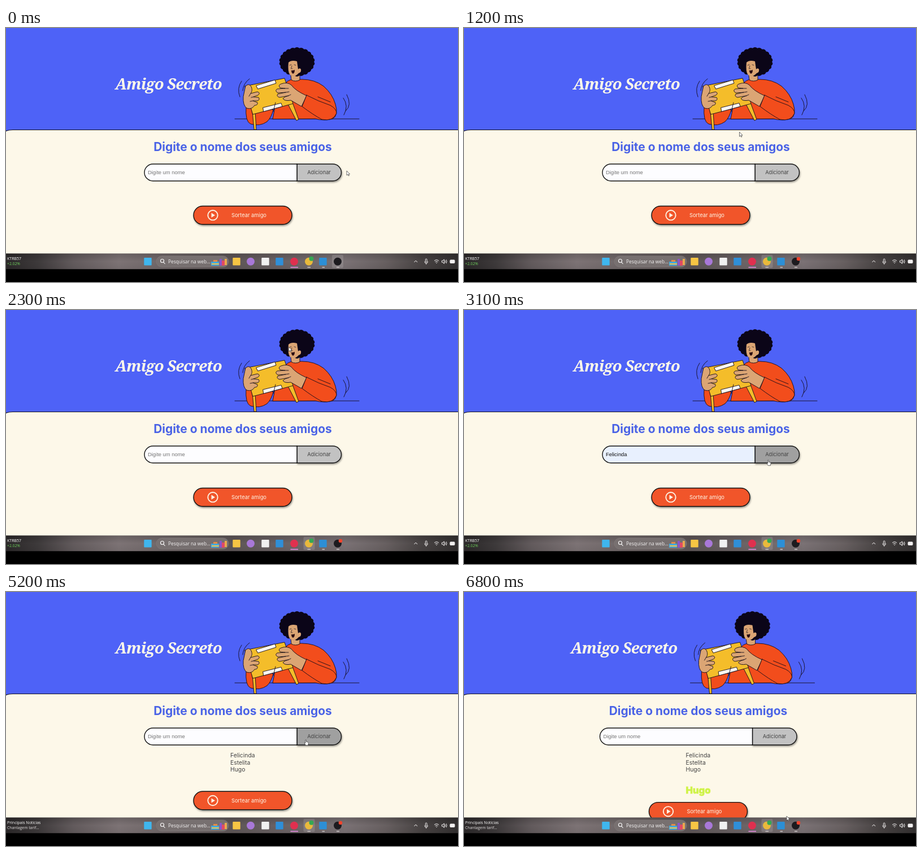
Recreate the animation shown at these times as an HTML page. Size 800 by 450 pixels, loop 6900 ms.

```html
<!DOCTYPE html>
<html lang="pt-BR">
<head>
<meta charset="utf-8">
<title>Amigo Secreto</title>
<style>
html, body { margin: 0; width: 100%; height: 100%; overflow: hidden; background: #000; }
svg { display: block; width: 800px; height: 450px; }
text { font-family: Inter, sans-serif; }
.title { font: italic 900 27.5px "Noto Serif", serif; letter-spacing: -.9px; fill: #fdf8ea; }
.heading { font-size: 20.9px; font-weight: 700; fill: #4a63e6; }
.field { font: 9.4px "Liberation Sans", Arial, sans-serif; }
.btn { font-size: 9.3px; }
.list text { font-size: 10.4px; fill: #444; }
.bar text, .dialog text { font-family: "Open Sans", "Noto Sans", sans-serif; }
.art { stroke: #160d1c; stroke-width: .9; stroke-linejoin: round; stroke-linecap: round; }
.coat { fill: #f24d1c; }
.skin { fill: #dba574; }
.wood { fill: #f4bd2a; }
.paper { fill: #fbf7f2; }
.line { fill: none; }
#result { font-weight: 800; paint-order: stroke; stroke-width: 1px; }
.shadow { filter: drop-shadow(1px 2px 1.5px rgba(0, 0, 0, .4)); }
</style>
</head>
<body>
<svg viewBox="0 0 800 450">
  <defs>
    <linearGradient id="steel">
      <stop offset="0" stop-color="#2d2a2b"/>
      <stop offset=".07" stop-color="#403c3d"/>
      <stop offset=".15" stop-color="#675f61"/>
      <stop offset=".25" stop-color="#82787a"/>
      <stop offset=".34" stop-color="#766d6e"/>
      <stop offset=".5" stop-color="#625a5b"/>
      <stop offset=".75" stop-color="#80777a"/>
      <stop offset=".84" stop-color="#6c6465"/>
      <stop offset=".92" stop-color="#4b4646"/>
      <stop offset="1" stop-color="#353232"/>
    </linearGradient>
    <linearGradient id="shade" x2="0" y2="1">
      <stop offset="0" stop-opacity=".2"/>
      <stop offset=".5" stop-opacity=".04"/>
      <stop offset="1" stop-opacity=".1"/>
    </linearGradient>
  </defs>

  <rect width="800" height="400" fill="#4e62f7"/>
  <g class="shift">
    <text class="title" x="287.5" y="109" text-anchor="middle">Amigo Secreto</text>
    <g class="art">
      <path class="line" d="M405 161H625"/>
      <path class="line" d="M417 94Q408 107 414 122M431 90Q420 98 419 111M597 124Q607 138 598 154M603 118Q613 137 601 147"/>
      <path class="coat" d="M425 139Q423 166 433 170Q449 175 462 166Q470 158 473 145L450 138Z"/>
      <path class="coat" d="M472 161Q476 140 480 122L493 100Q498 92 508 91H524Q546 91 562 103Q578 117 583 135Q589 155 578 161Q564 165 548 161Z"/>
      <path class="skin" d="M504 84L505 92Q512 96 520 92V78Z"/>
      <path id="hair" fill="#0b0518" stroke="none"/>
      <path class="skin" stroke="none" d="M500 61Q498 80 504 84Q511 88 518 80Q523 79 522 73Q520 70 517 73L515 59Q505 56 500 61Z"/>
      <path class="line" stroke-width=".7" d="M502 66L505 65M510 65L513 66M506 67L504.5 72H507"/>
      <path d="M505 75Q508 76 511 74Q511 80 508 81Q505 80 505 75Z" fill="#2a0d12" stroke="none"/>
      <path class="wood" d="M436 147L439 180H443L441 147ZM499 135L514 164L518 162L507 132Z"/>
      <path class="wood" d="M423 103L493 89L508 134L437 153Z"/>
      <path class="paper" d="M443 102L476 92L478 98L446 108ZM455 141L487 133L489 139L456 148Z"/>
      <path class="skin" d="M424 103Q430 97 434 104Q437 111 433 116L445 113Q451 115 446 119L438 122L447 123Q450 127 445 129L437 129L445 132Q446 137 440 137Q435 145 426 142Q419 137 420 122Z"/>
      <path class="line" d="M433 116L430 121M438 122L434 123M437 129L432 130"/>
      <path class="skin" d="M532 120L523 139L504 128Q493 130 490 125Q494 121 500 120L484 123Q478 121 481 117L495 114L481 115Q475 111 480 108L494 107L485 106Q481 101 487 99Q498 95 505 101Q512 111 532 120Z"/>
      <path class="line" d="M495 114L501 113M494 107L500 107M500 120L504 118"/>
      <path class="coat" d="M532 119L524 139Q544 154 559 162Q579 166 585 151Q585 143 574 137Q553 130 532 119Z"/>
      <path class="line" d="M552 122L574 131M473 148L477 132"/>
    </g>
  </g>

  <path d="M-4 185Q1 180.5 12 180.5H804V404H-4Z" fill="#fdf8e9" stroke="#0f0d22" stroke-width="1.2"/>
  <g class="shift">
    <text class="heading" x="419" y="218" text-anchor="middle">Digite o nome dos seus amigos</text>
    <path id="add" class="shadow" d="M515 241H578.5A15 15 0 0 1 578.5 271H515Z" stroke="#111" stroke-width="1.4"/>
    <path id="input" d="M515 241H260A15 15 0 0 0 260 271H515Z" stroke="#111" stroke-width="1.4"/>
    <text id="value" class="field" x="251" y="259.3"></text>
    <text class="btn" x="554" y="259.3" text-anchor="middle" fill="#444">Adicionar</text>
    <g id="list" class="list"></g>
    <text id="result" x="419" text-anchor="middle"></text>
    <g id="draw">
      <rect class="shadow" x="332" y="315.5" width="174" height="32.5" rx="16" fill="#f1552a" stroke="#111" stroke-width="1.4"/>
      <circle cx="366" cy="331.7" r="8.7" fill="none" stroke="#fdf3e4" stroke-width="1.9"/>
      <path d="M363.5 327.6L370 331.7L363.5 335.8Z" fill="#fdf3e4"/>
      <text class="btn" x="430" y="335" text-anchor="middle" fill="#fdf8e9">Sortear amigo</text>
    </g>
  </g>

  <rect id="scrim" width="800" height="400" opacity=".6"/>
  <g id="dialog" class="dialog">
    <path d="M288 0H549V50Q549 52 547 52H290Q288 52 288 50Z" fill="#202228"/>
    <text id="message" x="300" y="5.3" font-size="7.2" fill="#c6c9d6"></text>
    <rect x="499" y="16" width="41" height="25.5" rx="12.7" fill="none" stroke="#b5c4fb" stroke-width="1.4"/>
    <rect x="501.5" y="18.5" width="36" height="20.5" rx="10" fill="#a9bbfa"/>
    <text x="519.5" y="31.5" font-size="7" text-anchor="middle" fill="#1c2550">OK</text>
  </g>

  <g class="bar">
    <rect y="399.5" width="800" height="28" fill="url(#steel)"/>
    <rect y="399.5" width="800" height="28" fill="url(#shade)"/>
    <rect y="427.5" width="800" height="23"/>
    <text id="news" x="2" y="411.3" font-size="7" fill="#fff"></text>
    <text id="detail" x="2" y="420.3" font-size="6.8"></text>
    <rect x="266" y="404" width="128" height="19.5" rx="9.7" fill="#777070" stroke="#857d7d" stroke-width=".6"/>
    <g fill="none" stroke="#fff" stroke-width="1.1">
      <circle cx="276.5" cy="412.5" r="3"/>
      <path d="M278.8 415L281.5 418"/>
    </g>
    <text x="287" y="417" font-size="8.3" fill="#f4f2f2">Pesquisar na web...</text>
    <path d="M363 414H377V421H363Z" fill="#43a9de"/>
    <path d="M364 417H377V419H364Z" fill="#f0c44c"/>
    <path d="M367 411H374V414H367Z" fill="#e58b45"/>
    <path d="M378 409H382V421H378Z" fill="#8b56c9"/>
    <path d="M382 412H387V421H382Z" fill="#e04b64"/>
    <path d="M387 409H391V420H387Z" fill="#e8a84f"/>
    <rect id="active" y="402" width="20" height="23" rx="2" fill="#fff" opacity=".14"/>
    <g id="icons"></g>
    <circle cx="540.5" cy="408.8" r="4" fill="#35a853"/>
    <circle id="rec" cx="592" cy="409" r="3.3" fill="#f0452e"/>
    <path d="M503.5 424H517" stroke="#e58be0" stroke-width="1.6"/>
    <path d="M533.5 424H539M559.5 424H564M585 424H590" stroke="#c9c3c3" stroke-width="1.4"/>
    <g fill="none" stroke="#f2f0f0" stroke-width="1">
      <path d="M722.5 415L725.3 412L728 415M741 413.5Q741 417 743.7 417T746.5 413.5M743.7 417V419"/>
      <rect x="742.4" y="409" width="2.6" height="6" rx="1.3"/>
      <path d="M758 412.5Q762 409 766 412.5M759.6 414.5Q762 412.3 764.4 414.5M761.2 416.3H762.8"/>
      <path d="M771.5 412.2H773L775.5 410V417.5L773 415.2H771.5ZM777.2 411.8Q778.6 413.7 777.2 415.8M779 410.4Q781.2 413.7 779 417"/>
      <rect x="786" y="411" width="8" height="5.5" rx="1" fill="#f2f0f0"/>
    </g>
  </g>

  <g id="cursor" stroke="#333" stroke-width=".7" stroke-linejoin="round" fill="#fff">
    <path d="M0 0V8L1.9 6.3L3.2 9L4.5 8.4L3.2 5.9L5.6 5.8Z"/>
    <path d="M0 0Q1.3-.7 1.5 .7V3.3L4.6 4.2Q5.6 4.6 5.3 6L4.6 9.6H.6L-1.8 6Q-2.2 4.9-.7 5.4L-.1 6Z"/>
    <path d="M-1.5-4H1.5M0-4V4M-1.5 4H1.5" fill="none"/>
  </g>
</svg>
<script>
const LOOP = 6900, STEP = 100, SHIFT = -4.5;
const names = ["Felicinda", "Estelita", "Hugo"];
const filledAt = [2800, 3800, 4800], addedAt = [3300, 4200, 5200];
const resultAt = 5700, newsAt = 5200;
const dialogs = [
  { from: 500, to: 1000, text: "Por favor, insira um nome" },
  { from: 1500, to: 2200, text: "Adicione pelo menos dois amigos para sortear" }
];
// time, x, y
const path = [
  [0, 603, 253], [100, 602, 253], [400, 554, 252], [600, 554, 252],
  [900, 519, 30], [1000, 519, 30], [1400, 456, 338.5], [1700, 456, 338.5],
  [2000, 519, 30], [2200, 519, 30], [2600, 400, 257], [2800, 400, 257],
  [3000, 538, 266], [3300, 537, 266], [3600, 400, 258], [3800, 400, 258],
  [4100, 527, 264], [4400, 527, 264], [4600, 400, 258], [4800, 400, 258],
  [5000, 530, 262], [5200, 530, 262], [5500, 438, 366], [5700, 437, 364],
  [6000, 437, 364], [6600, 571, 397], [6900, 571, 397]
];

const $ = id => document.getElementById(id);
const set = (node, attrs) => { for (const k in attrs) node.setAttribute(k, attrs[k]); };
const show = (node, on) => { node.style.display = on ? "" : "none"; };
const mix = (a, b, k) => a + (b - a) * k;
const ease = k => k * k * (3 - 2 * k);
const clamp = k => Math.max(0, Math.min(1, k));
function make(parent, tag, attrs) {
  const node = document.createElementNS("http://www.w3.org/2000/svg", tag);
  set(node, attrs);
  return parent.appendChild(node);
}

// Curly outline
const curls = 22, hairPoint = (i, rx, ry) => {
  const a = i / curls * 2 * Math.PI;
  return (515 + rx * Math.cos(a)).toFixed(1) + " " + (60 + ry * Math.sin(a)).toFixed(1);
};
let hair = "M" + hairPoint(0, 30, 24.5);
for (let i = 1; i <= curls; i++) hair += "Q" + hairPoint(i - .5, 33.5, 27.5) + " " + hairPoint(i, 30, 24.5);
set($("hair"), { d: hair });

const squares = [[251, "#3fb6ee"], [408, "#f6c544"], [459, "#f1f1f1"], [484, "#2f8fd8"], [561, "#2c8fd6"]];
const dots = [[433, "#a878d8"], [510, "#e0304f"], [536, "#e9b93c"], [587, "#1d1b1f"]];
for (const [x, fill] of squares) make($("icons"), "rect", { x: x - 6.7, y: 407, width: 13.4, height: 13.4, rx: 1, fill });
for (const [x, fill] of dots) make($("icons"), "circle", { cx: x, cy: 413.7, r: 7, fill });

const items = names.map((name, i) => {
  const item = make($("list"), "text", { x: 397, y: 293 + 12.6 * i });
  item.textContent = name;
  return item;
});

function cursorAt(t) {
  const i = path.findIndex(p => p[0] > t);
  const a = path[i - 1], b = path[i], k = ease((t - a[0]) / (b[0] - a[0]));
  return [mix(a[1], b[1], k), mix(a[2], b[2], k)];
}

function render(t) {
  const count = addedAt.filter(at => t >= at).length;
  const drawn = t >= resultAt;
  const grow = clamp((t - 5800) / 500);
  const dialog = dialogs.find(d => t >= d.from && t <= d.to);
  const [x, y] = cursorAt(t);
  const dx = drawn ? SHIFT : 0;
  const drop = 12.6 * count + (drawn ? mix(15.7, 19.3, grow) : 0);

  for (const g of document.querySelectorAll(".shift")) set(g, { transform: `translate(${dx})` });

  const filled = count < 3 && t >= filledAt[count];
  $("value").textContent = filled ? names[count] : "Digite um nome";
  set($("value"), { fill: filled ? "#111" : "#757575" });
  set($("input"), { fill: filled ? "#e8f0fe" : "#fdfdff" });
  items.forEach((item, i) => show(item, i < count));
  set($("draw"), { transform: `translate(0 ${drop})` });

  const result = $("result");
  show(result, drawn);
  result.textContent = names[2];
  const hue = mix(95, 74, grow);
  set(result, {
    y: mix(354, 357, grow), "font-size": mix(13.2, 16.6, grow),
    fill: `hsl(${hue} 88% 62%)`, stroke: `hsl(${hue - 8} 85% 68%)`
  });

  show($("scrim"), dialog);
  show($("dialog"), dialog);
  if (dialog) {
    $("message").textContent = dialog.text;
    const age = (t - dialog.from) / STEP;
    set($("dialog"), { opacity: age < 1 ? .01 : age < 2 ? .45 : t === dialog.to ? .5 : 1 });
  }

  const overAdd = x > 515 && x < 593 && y > 241 && y < 271;
  const overDraw = x > 332 + dx && x < 506 + dx && y > 315 + drop && y < 348 + drop;
  const overInput = x > 245 && x < 515 && y > 241 && y < 271;
  const kind = overAdd || overDraw ? 1 : overInput && !dialog ? 2 : 0;
  set($("add"), { fill: overAdd ? "#a0a0a0" : "#c2c2c2" });
  set($("cursor"), { transform: `translate(${x} ${y})` });
  [...$("cursor").children].forEach((shape, i) => show(shape, i === kind));

  const late = t >= newsAt;
  $("news").textContent = late ? "Principais Notícias" : "KTRB57";
  $("detail").textContent = late ? "Chantagem tarif..." : "+2.02%";
  set($("detail"), { fill: late ? "#e4e1e1" : "#6fd35c" });
  show($("rec"), t >= 200);
  set($("active"), { x: t >= 200 ? 526.5 : 577 });
}

function tick() {
  render(Math.floor(performance.now() % LOOP / STEP) * STEP);
  requestAnimationFrame(tick);
}
tick();
</script>
</body>
</html>
```
